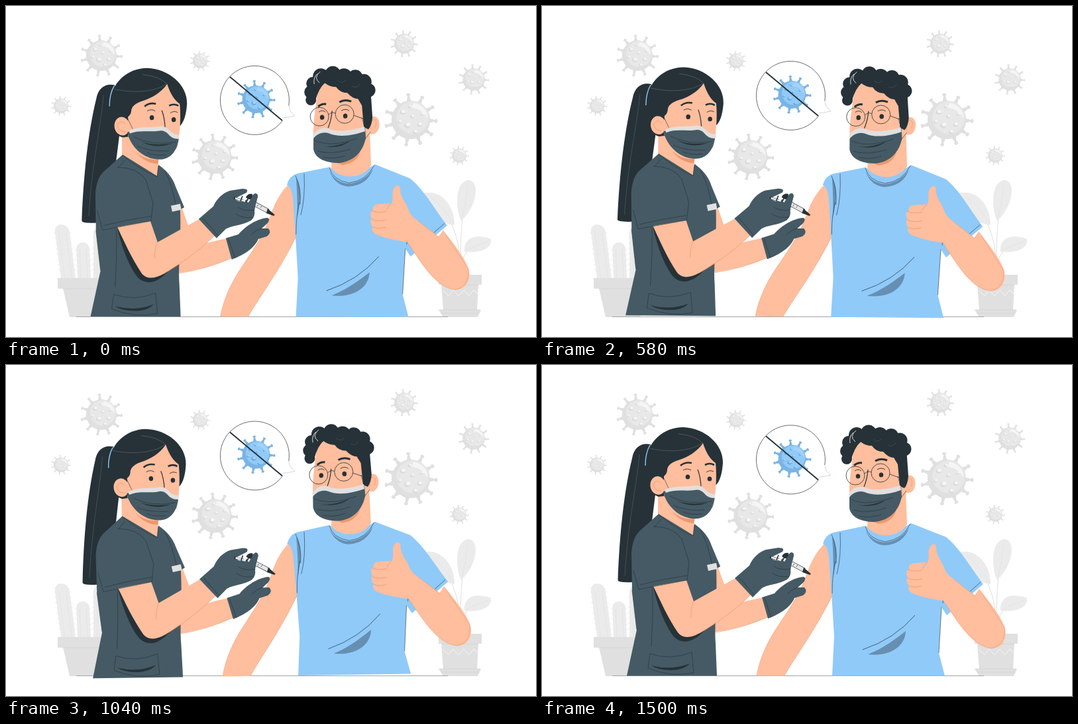
An HTML page with a canvas that plays this animation: 800x500 px, repeating every 1540 ms.

```html
<!DOCTYPE html>
<html lang="en">
<head>
<meta charset="utf-8">
<title>Vaccination</title>
<style>
html, body { margin: 0; width: 100%; height: 100%; overflow: hidden; background: #fff; }
canvas { display: block; }
</style>
</head>
<body>
<canvas id="stage" width="800" height="500"></canvas>
<script>
const ctx = document.getElementById('stage').getContext('2d');
const LOOP = 1540, STEPS = 37;
const INK = '#263238', SCRUBS = '#455a64', SKIN = '#ffbe9d', BLUSH = '#eb996e';
const BLUE = '#90caf9', FOLD = '#668fb1', POT = '#e0e0e0', LEAF = '#ebebeb';
const GRAY_VIRUS = { body: '#e0e0e0', light: '#e8e8e8', glint: '#f5f5f5', spot: '#dadada' };
const BLUE_VIRUS = { body: '#7ab4e4', light: BLUE, glint: '#a3d3fa', spot: '#6aa5d6' };

function fill(d, color) {
  ctx.fillStyle = color;
  ctx.fill(new Path2D(d));
}

function line(d, color = INK, width = 0.7) {
  ctx.strokeStyle = color;
  ctx.lineWidth = width;
  ctx.stroke(new Path2D(d));
}

function oval(x, y, rx, ry, color, tilt = 0) {
  ctx.fillStyle = color;
  ctx.beginPath();
  ctx.ellipse(x, y, rx, ry, tilt, 0, Math.PI * 2);
  ctx.fill();
}

function ring(x, y, r, width = 0.8) {
  ctx.strokeStyle = INK;
  ctx.lineWidth = width;
  ctx.beginPath();
  ctx.arc(x, y, r, 0, Math.PI * 2);
  ctx.stroke();
}

function virus(x, y, size, tone) {
  ctx.save();
  ctx.translate(x, y);
  ctx.scale(size, size);
  for (let i = 0; i < 11; i++) {
    ctx.save();
    ctx.rotate(i * Math.PI * 2 / 11 - 0.1);
    fill('M-.09-.66L-.03-.9H.03L.09-.66Z', tone.body);
    oval(0, -0.93, 0.075, 0.055, tone.body);
    ctx.restore();
  }
  oval(0, 0, 0.71, 0.71, tone.body);
  oval(0.07, -0.08, 0.6, 0.6, tone.light);
  fill('M.1-.62C.4-.58 .62-.35 .62-.05C.45-.3 .3-.42 .02-.45Z', tone.glint);
  const spots = [[-.3, -.28, .1], [.05, -.12, .07], [-.12, .2, .12], [.32, .18, .09],
    [-.42, .08, .07], [.15, .45, .08], [-.05, -.48, .06], [.4, -.2, .06]];
  for (const [sx, sy, r] of spots) {
    oval(sx, sy, r, r * 0.8, tone.spot);
    oval(sx + 0.03, sy - 0.03, r * 0.75, r * 0.6, tone.glint);
  }
  ctx.restore();
}

function cactus(x, y, width, height, lean) {
  ctx.save();
  ctx.translate(x, y);
  ctx.transform(1, 0, lean, 1, 0, 0);
  const h = width / 2;
  fill(`M${-h} 0V${h - height}A${h} ${h} 0 0 1 ${h} ${h - height}V0Z`, LEAF);
  for (const k of [-0.25, 0.25]) line(`M${k * width} 0V${h - height}`, POT, 0.6);
  for (let s = h; s < height - h; s += 8)
    line(`M${-h + 1} ${-s}l-3-2M${h - 1} ${-s}l3-2`, POT, 0.6);
  ctx.restore();
}

function background() {
  const spread = [[144, 75, 32.5], [293, 83, 15.5], [83, 151, 15.5], [315, 228, 36],
    [601, 57, 21], [706, 111, 23.5], [611, 172, 41], [684, 226, 15]];
  for (const [x, y, size] of spread) virus(x, y, size, GRAY_VIRUS);

  cactus(94, 411, 22, 81, 0.13);
  cactus(118, 411, 20, 54, 0.04);
  cactus(144, 411, 24, 80, 0);
  fill('M86 426H158L148 470H96Z', POT);
  fill('M78 411H166V427H78Z', POT);
  line('M86 427H158', '#cfcfcf', 0.6);

  line('M685 407C686 370 686 345 690 310M685 385C683 355 679 340 665 315M686 398C688 382 692 372 705 364', POT, 1);
  fill('M687 325C676 300 680 264 698 263C715 264 713 300 687 325Z', LEAF);
  fill('M677 331C650 328 638 310 629 283C655 276 677 300 677 331Z', LEAF);
  fill('M692 371C690 351 708 343 732 352C734 368 712 374 692 371Z', LEAF);
  line('M688 322Q694 300 697 270M676 329Q660 303 640 288M694 370Q710 360 727 356', POT, 0.6);
  fill('M657 420H713L711 460H660Z', POT);
  fill('M653 406H718V421H653ZM653 459H717L712 470H660Z', POT);
  line('M658 421.5H712M654 459H716M657 464H714', '#cfcfcf', 0.6);
  line('M660 430l8 8 7-9 8 9 8-9 8 9 7-9 6 6', '#f5f5f5', 1);
  line('M106 469.5H667', '#a0a4a6', 1);
}

function bubble(lift) {
  ctx.save();
  ctx.translate(0, lift);
  fill('M426.8 151A52 52 0 1 0 417.5 173.5Q420 169.5 436 166.5Q428 161 426.8 151', '#fff');
  line('M426.8 151A52 52 0 1 0 417.5 173.5', INK, 0.7);
  line('M417.5 169.5Q424 169 436 166.5Q428 161 426.8 151', '#bbb', 0.6);
  virus(377.5, 141.5, 29.5, BLUE_VIRUS);
  line('M338 107.5L417 173.5', INK, 1.9);
  ctx.restore();
}

function manHead() {
  oval(554, 180, 9.5, 13.5, SKIN, 0.15);
  line('M550 186Q548 174 555 171Q561 173 557 184', BLUSH);
  fill('M549 190L551 241C538 262 505 262 491 245L492 228Z', SKIN);
  fill('M500 237Q522 234 535 218Q531 237 508 240Z', BLUSH);
  fill('M470 132L480 112L535 125L546 150L547 190L538 215L465 205C462 185 466 160 470 132Z', SKIN);

  const curls = [[463, 117, 10], [460, 130, 10], [460, 142, 8], [475, 106, 12], [493, 102, 11.5],
    [510, 106, 12], [527, 107, 11], [540, 114, 11.5], [547, 127, 10.5], [541, 137, 8]];
  for (const [x, y, r] of curls) oval(x, y, r, r, INK);
  fill('M462 120L480 102L520 101L550 125L553 168Q552 180 547 186L540 183L537 150L531 140Q523 140 515 131Q504 131 498 122Q488 122 481 116Q472 124 467 142L462 150Z', INK);
  line('M465 118Q463 108 470 102M473 116Q463 108 474 99', '#fff', 0.8);
  line('M500 112Q506 118 512 112M522 121Q530 125 534 117', SCRUBS, 0.6);

  line('M471 152Q476 147 483 148M503 145Q511 140 521 144', INK, 3);
  line('M472 160Q477 156 482 160M506 158Q512 154 518 158', INK, 0.9);
  oval(477, 168, 3.3, 3.6, INK);
  oval(512, 166, 3.3, 3.6, INK);
  line('M492 158Q491 172 486 184', INK, 1.2);
  ring(473, 167, 14);
  ring(511, 163, 14);
  line('M487 164Q492 159 497 162M525 165L539 170', INK, 0.8);

  fill('M464 197C470 189 480 189 487 191C500 197 522 192 542 184L543 198C540 218 526 235 502 237C480 237 466 229 464 216Z', SCRUBS);
  fill('M463 195C468 186 478 182 487 185C500 191 522 188 541 182L542 189C525 195 503 199 487 192C478 189 469 193 464 200Z', POT);
  fill('M470 210Q490 216 519 204Q500 218 470 210Z', INK);
  line('M466 203Q490 214 530 200M470 219Q492 225 520 216M478 228Q494 232 512 226', INK, 0.6);
  line('M541 182L537 168M541 202L550 190', INK, 0.6);
}

function man() {
  fill('M430 266C412 283 405 300 398 320C391 342 375 366 355 396C340 418 328 445 324 469.5H366C380 444 412 402 440 345L441 270Z', SKIN);
  line('M398 320C391 342 375 366 355 396C340 418 328 445 324 469M366 469C380 444 412 402 437 350', BLUSH, 0.5);

  fill('M488 243L440 253Q428 256 424 270Q431 273 433 290L437 345L441 410L438 469.5H608L599 435L603 366L611 378L666 331C645 303 630 276 610 260L557 239Q520 264 488 243Z', BLUE);
  line('M603 366L599 435', INK, 0.6);
  line('M605 360C608 330 604 318 600 308M646 342L662 328', INK, 0.6);
  fill('M438 260Q445 270 444 292L440 320Q440 285 438 260Z', FOLD);
  line('M437 256Q446 275 444 300M450 253Q452 290 445 316M438 345Q438 315 443 296', INK, 0.6);

  manHead();
  line('M488 244Q493 263 518 267Q544 264 556 240', INK, 0.6);
  fill('M488 249Q498 267 518 268Q540 266 554 246Q545 271 517 272.5Q497 271 488 249Z', FOLD);

  line('M484 430Q532 414 563 378', INK, 0.7);
  fill('M492 437C516 428 536 412 549 402C548 426 524 441 492 437Z', FOLD);

  fill('M606 356C588 354 572 350 559 345Q550 340 554 333Q548 328 552 320Q547 313 554 308Q552 299 565 299L582 298C586 290 581 281 586 274Q592 267 595 274C594 286 602 295 606 303C609 314 614 318 622 324L653 348L660 338C675 358 691 377 698 395C704 413 694 429 678 428C650 424 632 395 606 356Z', SKIN);
  line('M552 309Q562 313 574 310M552 322Q562 326 574 323M554 334Q563 337 573 334M582 298Q576 303 574 308', BLUSH, 0.8);
  line('M622 324L654 349M606 356C632 395 650 424 678 428Q700 424 698 397L664 345', BLUSH, 0.6);
}

function womanHead() {
  fill('M164 120C151 117 139 123 136 141C124 190 117 255 114.5 325Q115 329 137 328L166 236L171 196L160 160Z', INK);
  line('M147 135C142 190 130 235 125 318', '#53636b', 0.6);
  fill('M175 188V227L228 257L231 228L200 215Z', SKIN);
  fill('M196 221Q212 235 230 232L229 239Q210 238 196 221Z', BLUSH);
  fill('M176 199C160 194 154 172 156 150C158 115 184 94 213 94C246 95 274 120 273 148C272 165 268 176 263 181L200 196Z', INK);
  line('M163 121Q156 133 156 152', BLUE, 1.4);
  line('M163 126C190 132 224 131 242 118M243 118Q230 106 206 104', '#607078', 0.6);
  fill('M243 118C234 131 221 139 205 144Q190 149 189 158Q189 164 184 168L184 200L228 230L258 215C263 195 264 165 262 148Q250 140 243 118Z', SKIN);
  oval(175, 182, 11.5, 14, SKIN, -0.15);
  line('M180 190Q168 190 168 180Q173 171 180 179', BLUSH, 0.8);

  line('M209 152Q216 146 226 148M246 151Q253 147 260 151', INK, 2.6);
  line('M213 159Q219 155 225 159M248 162Q253 158 259 161', INK, 0.9);
  oval(220, 169, 3.3, 3.6, INK);
  oval(253, 172, 3.3, 3.6, INK);
  line('M235 158Q239 168 240 183', INK, 1.2);

  fill('M183 191C200 184 219 186 234 184Q242 185 248 193Q254 197 261 197C260 214 252 230 235 232C208 234 187 212 183 191Z', SCRUBS);
  fill('M185 189C200 181 218 185 234 182Q243 183 249 191Q255 195 261 195L261 201Q251 202 244 193Q238 187 230 189C216 191 201 187 187 193Z', POT);
  fill('M204 205Q222 212 250 208Q226 217 204 205Z', INK);
  line('M193 198Q218 212 256 206M198 212Q218 221 246 219M213 222Q225 227 242 225', INK, 0.6);
  line('M191 186L183 169M186 199L181 194', INK, 0.6);
}

function syringe() {
  line('M344 290L358 294', INK, 3.4);
  line('M346 290.5L361 295', '#f5f5f5', 2.4);
  line('M357 287L354 295', INK, 1.6);
  line('M364 293L396 310', INK, 7);
  line('M365 293.5L395 309.5', '#e6e6e6', 5.6);
  line('M376 297l-2 3M381 300l-2 3M386 302l-2 3', INK, 0.6);
  fill('M395 306L406 315.5L404 317L393 313Z', INK);
}

function woman() {
  womanHead();
  fill('M262 303L266 306L276 334L258 348Z', SKIN);
  fill('M255 378L300 359Q318 354 334 351L341 381Q302 398 258 404Z', SKIN);
  line('M262 404Q302 398 340 381', BLUSH, 0.6);
  fill('M332 351L351 345C362 332 380 321 395 320Q400 322 394 329L386 336H396Q402 342 394 348L381 352C376 365 360 376 341 383Z', SCRUBS);
  line('M386 336Q376 339 370 346M336 352L346 381', INK, 0.6);

  fill('M176 225L228 257L230 240Q250 254 256 273L269 304L263 308C265 350 260 390 262 420L264 469.5H128L143 400L136 340L135 285Q136 262 147 251Z', SCRUBS);
  line('M180 233L168 246M176 226Q200 246 228 258L230 242M239 249Q251 268 258 309L269 304', INK, 0.6);
  line('M167 337Q168 380 165 425M136 340L143 400', INK, 0.6);
  fill('M168 335C174 362 185 392 198 409C212 425 231 417 245 401L210 390Z', INK);

  fill('M168 334L218 325L229 357L294 321L315 347C290 372 260 392 238 405C224 413 212 413 205 404C190 382 178 355 168 334Z', SKIN);
  line('M229 357Q224 367 225 382M315 347C290 372 260 392 238 405', BLUSH, 0.7);
  fill('M146 339L138 310V272Q142 250 168 244Q198 244 211 263L222 298L219 325Q180 331 146 339Z', SCRUBS);
  line('M146 339L138 310M168 244Q198 244 211 263L222 298L219 325L146 339M148 332Q183 323 219 318', INK, 0.6);
  fill('M249 302L263 299L265 308L251 311Z', POT);
  line('M163 436L160 458Q193 472 229 465L226 434Q193 447 163 436', INK, 0.6);
  fill('M165 454Q195 462 223 451Q214 461 194 461Q176 461 165 454Z', INK);

  fill('M291 322L313 303C318 291 328 282 338 279L357 276Q367 276 363 282L345 291C352 297 359 297 366 290L376 283Q382 284 379 292L375 308Q377 318 370 324C356 332 342 331 332 337L318 351Z', SCRUBS);
  syringe();
  fill('M362 289Q365 283 372 284L371 291Q367 294 362 289Z', INK);
  fill('M366 297Q372 287 377 283Q382 284 379 292L375 308Q368 309 360 305Z', SCRUBS);
  line('M376 308Q360 311 350 304M373 319Q358 322 347 314M297 320L320 347', INK, 0.6);
}

// Triangle sway: 0, +1, 0, -1 at the quarters of the loop.
function sway(p) {
  return p < 0.25 ? 4 * p : p < 0.75 ? 2 - 4 * p : 4 * p - 4;
}

function draw(now) {
  const step = Math.floor((now % LOOP) / LOOP * STEPS);
  const p = (step + 1) / STEPS % 1;
  ctx.fillStyle = '#fff';
  ctx.fillRect(0, 0, 800, 500);
  background();
  bubble(-10 * (1 - Math.abs(1 - 2 * p)));
  ctx.save();
  ctx.translate(400, 250);
  ctx.rotate(sway(p) * Math.PI / 180);
  ctx.translate(-400, -250);
  man();
  woman();
  ctx.restore();
}

const start = performance.now();
function tick() {
  draw(performance.now() - start);
  requestAnimationFrame(tick);
}
tick();
</script>
</body>
</html>
```
